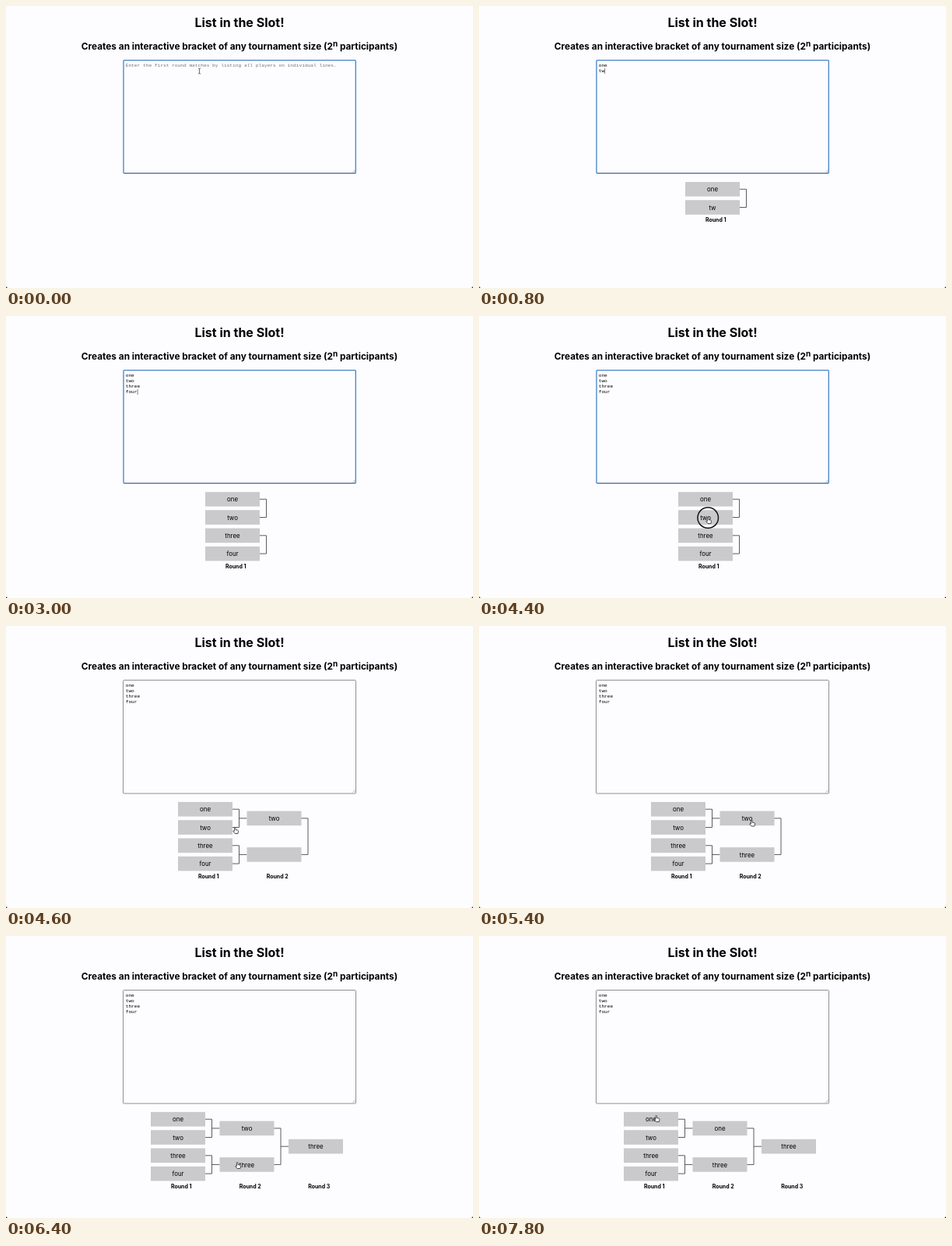
Animation of 600x362 px, one loop 8000 ms. Source, as an HTML page:

```html
<!DOCTYPE html>
<html lang="en">
<head>
<meta charset="utf-8">
<title>Bracket maker</title>
<style>
  html, body { margin: 0; width: 100%; height: 100%; overflow: hidden; background: #fdfcfe; }
  svg { display: block; width: 600px; height: 362px; }
  text { font-family: Inter, sans-serif; white-space: pre; }
  .middle { text-anchor: middle; }
  .bold { font-weight: 700; }
  .mono { font: 6.2px "Liberation Mono", monospace; }
  .line { fill: none; stroke: #4a4a4c; }
</style>
</head>
<body>
<svg viewBox="0 0 600 362">
  <text class="middle bold" x="300" y="27" font-size="16">List in the Slot!</text>
  <text class="middle bold" x="300" y="56.3" font-size="11.82">Creates an interactive bracket of any tournament size (2<tspan dy="-4.5" font-size="10">n</tspan><tspan dy="4.5"> participants)</tspan></text>
  <path d="M0 360v2h2zM600 360v2h-2z" fill="#333"/>
  <g id="scene"></g>
</svg>
<script>
const STEP = 200, LOOP = 8000;
const PLAYERS = "one\ntwo\nthree\nfour";
const PLACEHOLDER = "Enter the first round matches by listing all players on individual lines.";
// Number of characters typed at each step.
const TYPED = [0, 1, 3, 4, 6, 7, 7, 8, 9, 10, 12, 14, 15, 16, 17, 18];
const CARET_OFF = 16, BLUR = 23;
// Pointer keys: step, x, y.
const POINTER = [[19, 250, 92], [20, 262, 150], [21, 288, 240], [22, 295, 262.5], [23, 295, 262.5],
  [24, 270, 278], [25, 262, 285], [26, 305, 268], [27, 351, 253], [28, 351, 253],
  [29, 342, 262], [30, 312, 288], [31, 298, 294.5], [32, 298, 294.5], [33, 275, 275],
  [34, 240, 246], [35, 228.5, 234.5]];
const CLICKS = [22, 25, 28, 31, 35];
const BOX_W = 70, BOX_H = 18.6, COL = 88.5, ROW = 23.3, FIRST_Y = 235.2;

const scene = document.getElementById("scene");
const label = (cls, x, y, size, s) =>
  `<text class="${cls}" x="${x}" y="${y}" font-size="${size}">${s}</text>`;

function textArea(step, value) {
  const focused = step < BLUR;
  let out = focused
    ? `<rect x="151" y="69.7" width="298.3" height="145" rx="1" fill="#fdfcfe" stroke="#4583cb" stroke-width="1.3"/>
       <path class="line" d="M152 214.7H449" stroke-width=".5"/>`
    : `<rect x="150.5" y="69.5" width="299" height="145.5" rx="1" fill="#fdfcfe" stroke="#909092"/>`;
  out += `<path class="line" d="M445.5 213.5l3-3M447.5 213.5l1-1" stroke-width=".4"/>`;
  if (!value) return out + `<text class="mono" x="153.7" y="78.3" fill="#757575">${PLACEHOLDER}</text>`;

  const lines = value.split("\n");
  lines.forEach((s, i) => out += `<text class="mono" x="153.7" y="${78.3 + 7 * i}">${s}</text>`);
  if (step < CARET_OFF) {
    const x = 154.2 + 3.72 * lines.at(-1).length, y = 73 + 7 * (lines.length - 1);
    out += `<path class="line" d="M${x} ${y}v7" stroke-width=".7"/>`;
  }
  return out;
}

function roundsAt(step, value) {
  const names = value.split("\n").filter(Boolean);
  if (!names.length) return [];
  const size = 2 ** Math.floor(Math.log2(names.length));
  const rounds = [names.slice(0, size)];
  if (step >= 23) rounds.push([step < 36 ? "two" : "one", step < 26 ? "" : "three"]);
  if (step >= 29) rounds.push([step < 32 ? "two" : "three"]);
  return rounds;
}

function bracket(rounds) {
  if (!rounds.length) return "";
  const rows = rounds[0].length;
  const left = rows === 4 ? 291 - 35 * rounds.length : 265;
  let out = "";
  rounds.forEach((names, r) => {
    const x = left + r * COL, gap = ROW * 2 ** r;
    const centre = i => FIRST_Y + (gap - ROW) / 2 + i * gap;
    names.forEach((name, i) => {
      const y = centre(i);
      out += `<rect x="${x}" y="${y - BOX_H / 2}" width="${BOX_W}" height="${BOX_H}" fill="#cac9cb"/>`
        + label("middle", x + BOX_W / 2, y + 3.2, 7.9, name);
      if (i % 2) {
        const stub = rounds[r + 1] ? `M${x + 78.5} ${y - gap / 2}H${x + COL}` : "";
        out += `<path class="line" stroke-width=".9" d="M${x + BOX_W} ${y - gap}h8.5v${gap}h-8.5${stub}"/>`;
      }
    });
    out += label("middle bold", x + 39.2, FIRST_Y + rows * ROW - 4.6, 7, `Round ${r + 1}`);
  });
  return out;
}

function pointer(step) {
  const key = step === 0 ? [0, 248.5, 83.5] : POINTER.findLast(k => k[0] <= step);
  if (!key) return "";
  const [, x, y] = key;
  const shape = y < 215
    ? `<path class="line" stroke-width=".8" d="M-1.5 -3.5Q0 -3.5 0 -2.5Q0 -3.5 1.5 -3.5M0 -2.5V2.5M-1.5 3.5Q0 3.5 0 2.5Q0 3.5 1.5 3.5"/>`
    : `<path fill="#fff" stroke="#222" stroke-width=".8" stroke-linejoin="round"
        d="M-1.6 1V-3.2a.8.8 0 0 1 1.6 0V-.9l2.6.5q1 .3.9 1.3L2.9 4H-.8L-3.3 1Q-2.9-.2-1.6 1z"/>`;
  const ring = CLICKS.includes(step)
    ? `<circle cx="-.8" cy="-3.5" r="13.3" fill="none" stroke="#151515" stroke-width="1.5"/>` : "";
  return `<g transform="translate(${x} ${y})">${shape}${ring}</g>`;
}

let shown = -1;
function frame(now) {
  const step = Math.floor(now % LOOP / STEP);
  if (step !== shown) {
    shown = step;
    const value = PLAYERS.slice(0, TYPED[Math.min(step, TYPED.length - 1)]);
    scene.innerHTML = textArea(step, value) + bracket(roundsAt(step, value)) + pointer(step);
  }
  requestAnimationFrame(frame);
}
frame(performance.now());
</script>
</body>
</html>
```
